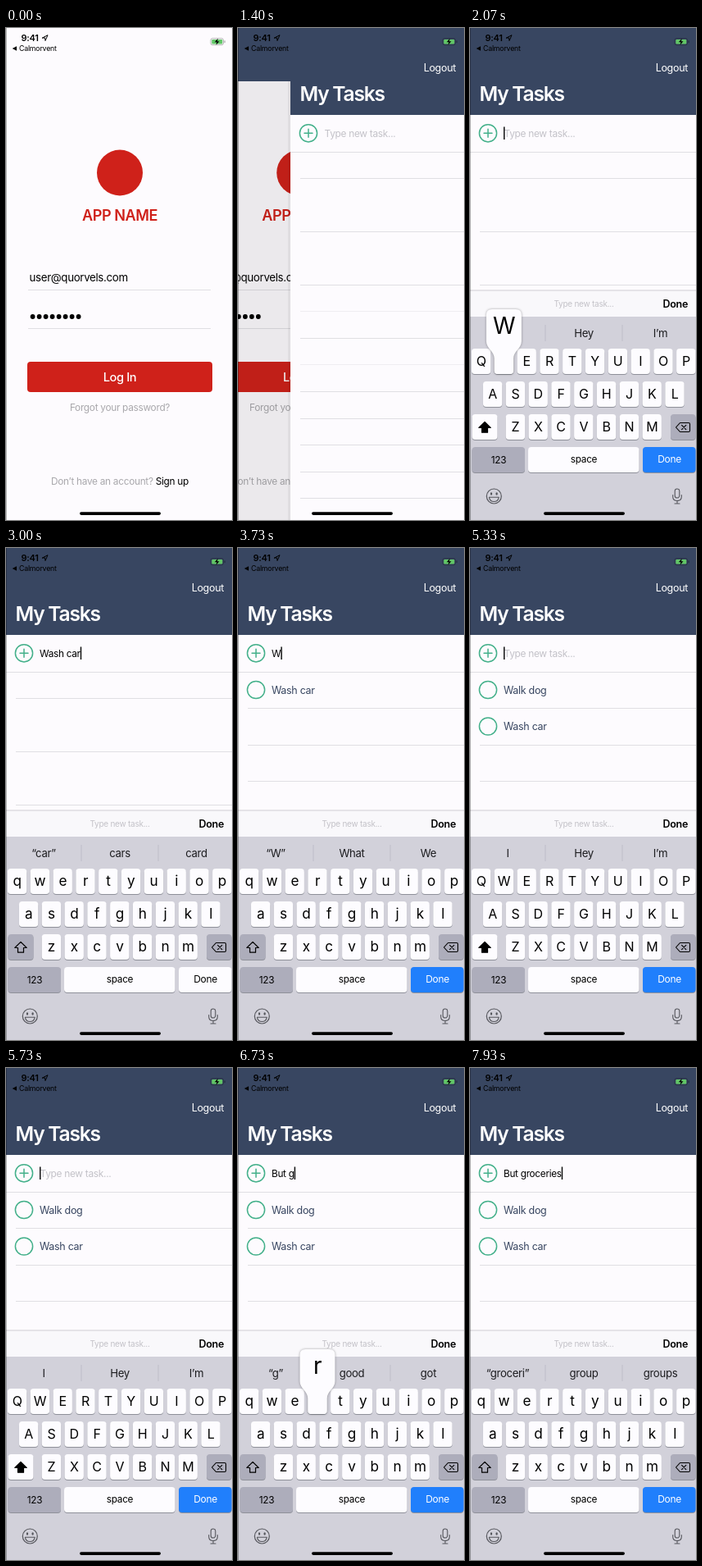
Animation, 276 px wide and 600 px high, one loop 8000 ms. Source, as an HTML page:

```html
<!DOCTYPE html>
<html lang="en">
<head>
<meta charset="utf-8">
<title>Task list</title>
<style>
  html, body { margin: 0; width: 100%; height: 100%; overflow: hidden; background: #fdfbfe; }
  svg { display: block; width: 276px; height: 600px; }
  text { font-family: Inter, Roboto, sans-serif; letter-spacing: -.025em; white-space: pre; }
</style>
</head>
<body>
<script>
const LOOP = 8000, W = 276, H = 600;
const PAPER = '#fdfbfe', NAVY = '#384661', RED = '#cf211a', GREEN = '#43b08a';
const LINE = '#e0dfe3', BLUE = '#207ffc', KEY = '#fdfcff', KEY_DARK = '#adadbb', HINT = '#c3c2c8';
const HOLD = 90, DONE_HOLD = 100;

const entries = [
  { word: 'Wash car', start: 1990, step: 115, done: 2960 },
  { word: 'Walk dog', start: 3600, step: 140, done: 4930 },
  { word: 'But groceries', start: 5915, step: 157, done: Infinity }
];

// Keyed by what has been typed; the longest matching prefix wins.
const suggestions = {
  '': 'I|Hey|I’m',
  'W': '“W”|What|We',
  'Wa': '“Wa”|Was|Want',
  'Was': '“Was”|Wasn’t|Wash',
  'Wash': '“Wash”|Washed|Washing',
  'Wash ': 'the|my|your',
  'Wash c': '“c”|can|could',
  'Wash ca': '“ca”|can|car',
  'Wash car': '“car”|cars|card',
  'Wal': '“Wal”|Walk|Wall',
  'Walk': '“Walk”|Walking|Walked',
  'Walk ': 'to|in|the',
  'Walk d': '“d”|do|down',
  'Walk do': '“do”|don’t|down',
  'Walk dog': '“dog”|dogs|dogg',
  'B': '“B”|But|Be',
  'Bu': '“Bu”|But|Busy',
  'But': '“But”|Butt|Button',
  'But ': 'I|it|you',
  'But g': '“g”|good|got',
  'But gr': '“gr”|great|group',
  'But gro': '“gro”|group|grow',
  'But groc': '“groc”|grocery|group',
  'But groce': '“groce”|grocery|grocer',
  'But groceri': '“groceri”|group|groups'
};

function el(parent, tag, attrs = {}, content) {
  const node = document.createElementNS('http://www.w3.org/2000/svg', tag);
  for (const name in attrs) node.setAttribute(name, attrs[name]);
  if (content !== undefined) node.textContent = content;
  return parent.appendChild(node);
}
const group = parent => el(parent, 'g');
const rect = (parent, x, y, width, height, fill, rx = 0) =>
  el(parent, 'rect', { x, y, width, height, fill, rx });
const label = (parent, x, y, size, content, attrs = {}) =>
  el(parent, 'text', { x, y, 'font-size': size, ...attrs }, content);
const centred = (parent, x, y, size, content, attrs = {}) =>
  label(parent, x, y, size, content, { 'text-anchor': 'middle', ...attrs });
const stroke = (parent, d, color, width = 1.2) =>
  el(parent, 'path', { d, fill: 'none', stroke: color, 'stroke-width': width,
    'stroke-linejoin': 'round', 'stroke-linecap': 'round' });
const ring = (parent, cx, cy, r, color, width) =>
  el(parent, 'circle', { cx, cy, r, fill: 'none', stroke: color, 'stroke-width': width });
const show = (node, on) => node.setAttribute('visibility', on ? 'visible' : 'hidden');
const move = (node, x, y) => node.setAttribute('transform', `translate(${x} ${y})`);
const clamp = (v, lo = 0, hi = 1) => Math.min(hi, Math.max(lo, v));
const easeOut = (t, start, length) => 1 - (1 - clamp((t - start) / length)) ** 3;

const svg = el(document.body, 'svg', { viewBox: `0 0 ${W} ${H}` });
rect(svg, 0, 0, W, H, PAPER);

// Login screen
const login = group(svg);
el(login, 'circle', { cx: 139, cy: 176.5, r: 28, fill: RED });
centred(login, 139, 234.5, 18.1, 'APP NAME', { 'font-weight': 600, fill: RED });
label(login, 28.5, 309, 13.3, 'user@quorvels.com');
for (let i = 0; i < 8; i++) el(login, 'circle', { cx: 32.6 + i * 8, cy: 352, r: 2.9 });
rect(login, 27, 319, 223, 1, LINE);
rect(login, 27, 366, 223, 1, LINE);
rect(login, 26, 407, 226, 37, RED, 4);
centred(login, 139, 431, 14.6, 'Log In', { 'font-weight': 500, fill: '#fff' });
centred(login, 139, 467, 11.85, 'Forgot your password?', { fill: '#a9a8ac' });
const signUp = centred(login, 139, 557, 11.85, '', { fill: '#a9a8ac' });
el(signUp, 'tspan', {}, 'Don’t have an account? ');
el(signUp, 'tspan', { fill: '#000' }, 'Sign up');
const dim = rect(svg, 0, 0, W, H, '#000');

// Task screen
const bar = rect(svg, 0, 0, W, 65, NAVY);
const page = group(svg);
rect(page, -3, 65, 3, H, 'rgba(0,0,0,.05)');
rect(page, 0, 0, W, H, PAPER);
rect(page, 0, 0, W, 106, NAVY);
label(page, 11.5, 89, 24.6, 'My Tasks',
  { 'font-weight': 600, fill: '#fff', style: 'letter-spacing:-.05em' });
ring(page, 22, 128.3, 10.6, GREEN, 1.5);
stroke(page, 'M17 128.3h10M22 123.3v10', GREEN, 1.5);
rect(page, 0, 151, W, 1, LINE);
const hint = label(page, 41.5, 132.5, 11.9, 'Type new task...', { fill: HINT });
const input = label(page, 41, 132.5, 11.8, '');
const caret = rect(page, 41, 120.5, 1.5, 15.5, '#111');

const emptyLines = group(page);
for (const y of [183, 248, 313, 345, 378, 410, 443, 476, 508, 541, 573])
  rect(emptyLines, 12, y, W, 1, y === 345 || y === 410 ? '#efedf1' : LINE);
const taskLines = group(page);
for (const y of [195, 240, 284]) rect(taskLines, 12, y, W, 1, LINE);

const rows = [173, 217.5].map(y => {
  const row = group(page);
  ring(row, 22, y, 10.6, GREEN, 1.5);
  return { row, name: label(row, 41, y + 4.5, 12.5, '', { fill: NAVY }) };
});
const logout = label(svg, 266, 53, 12.5, 'Logout', { 'text-anchor': 'end', fill: '#fff' });

// Keyboard with its toolbar
const keyboard = group(svg);
rect(keyboard, 0, 320, W, 33, '#f9f8fb');
rect(keyboard, 0, 319.5, W, 1, '#cfced3');
centred(keyboard, 139, 340, 10, 'Type new task...', { fill: HINT });
label(keyboard, 266, 340.5, 12.5, 'Done', { 'text-anchor': 'end', 'font-weight': 600 });
rect(keyboard, 0, 352, W, 248, '#d2d1da');
for (const x of [92, 186]) rect(keyboard, x - .5, 362, 1, 20, '#bdbec7');
const guesses = [46, 139, 232.5].map(x => centred(keyboard, x, 376.5, 13.2, '', { fill: '#1c1c1f' }));

function cap(x, y, width, fill = KEY) {
  rect(keyboard, x, y + 1, width, 31, '#8e9099', 4);
  return rect(keyboard, x, y, width, 31, fill, 4);
}
const keys = {};
[['qwertyuiop', 13.6, 391], ['asdfghjkl', 27.6, 431], ['zxcvbnm', 55.4, 471]]
  .forEach(([letters, x0, y]) => [...letters].forEach((char, i) => {
    const x = x0 + 27.8 * i;
    cap(x - 11.7, y, 23.4);
    keys[char] = { x, y, text: centred(keyboard, x, y + 21.2, 17, char) };
  }));
const shiftCap = cap(2.5, 471, 31);
const shiftIcon = stroke(keyboard, 'M18 480.3l-7.2 7.2h3.7v5.7h7v-5.7h3.7z', '#000', 1.2);
cap(245, 471, 30.5, KEY_DARK);
stroke(keyboard, 'M256.5 481.5h10.5q1.5 0 1.5 1.5v8q0 1.5-1.5 1.5h-10.5l-5-5.5zM258.6 484.4l5.2 5.2m0-5.2l-5.2 5.2', '#000', 1.1);
cap(2.5, 511, 64.5, KEY_DARK);
centred(keyboard, 35, 530.5, 11.8, '123');
const spaceCap = cap(71, 511, 135.5);
centred(keyboard, 139, 530, 11.8, 'space');
const doneCap = cap(211, 511, 64.5);
const doneText = centred(keyboard, 243.5, 530, 12, 'Done');

const ICON = '#55565c';
ring(keyboard, 29.3, 571, 9, ICON, 1.2);
for (const cx of [26, 32.6]) el(keyboard, 'ellipse', { cx, cy: 568, rx: 1.2, ry: 1.8, fill: ICON });
stroke(keyboard, 'M23.4 572.3h11.8q-.8 5.2-5.9 5.2t-5.9-5.2z', ICON, 1.1);
el(keyboard, 'rect', { x: 250.2, y: 562, width: 5.6, height: 11, rx: 2.8,
  fill: 'none', stroke: ICON, 'stroke-width': 1.1 });
stroke(keyboard, 'M247.7 569.5v2q0 5 5.3 5t5.3-5v-2M253 576.5v3.5m-3 0h6', ICON, 1.1);

const popup = group(keyboard);
el(popup, 'path', {
  d: 'M-11.7 27V12C-11.7 3-21.5 0-21.5-9V-41Q-21.5-48-14.5-48H14.5Q21.5-48 21.5-41V-9C21.5 0 11.7 3 11.7 12V27Q11.7 31 7.7 31H-7.7Q-11.7 31-11.7 27Z',
  fill: KEY, style: 'filter:drop-shadow(0 .5px 1.5px rgba(0,0,0,.35))'
});
const popupText = centred(popup, 0, -18, 28, '');

// Status bar, home indicator and screen edge
label(svg, 18.5, 16, 11, '9:41', { 'font-weight': 600 });
stroke(svg, 'M44.5 12l6.5-3.3-3 6.8-.4-3.2z', '#000', 1);
el(svg, 'path', { d: 'M13 22.3v5.4l-5.3-2.7z' });
label(svg, 16, 28, 8.8, 'Calmorvent');
el(svg, 'rect', { x: 250, y: 12.7, width: 15.5, height: 8, rx: 2.2,
  fill: 'none', stroke: 'rgba(0,0,0,.35)', 'stroke-width': .8 });
rect(svg, 251.3, 14, 13, 5.4, '#62c767', 1.2);
rect(svg, 266.5, 15.2, 1.2, 3, 'rgba(0,0,0,.35)', .6);
el(svg, 'path', { d: 'M258.8 12.8l-4 4.4h2.6l-.9 3.5 4-4.5h-2.5z' });
rect(svg, 90, 590.3, 99, 3.6, '#000', 1.8);
rect(svg, 0, 0, 1, H, 'rgba(0,0,0,.28)');

function suggest(typed) {
  let length = typed.length;
  while (!(typed.slice(0, length) in suggestions)) length--;
  return suggestions[typed.slice(0, length)].split('|');
}

function draw(t) {
  const push = easeOut(t, 1208, 500);
  move(login, -83 * push, 0);
  dim.setAttribute('opacity', .09 * push);
  show(bar, push > 0);
  show(page, push > 0);
  move(page, Math.round(W * (1 - push)), 0);
  logout.setAttribute('opacity', clamp(push * 1.3));
  move(keyboard, 0, 281 * (1 - easeOut(t, 1650, 250)));

  const tasks = entries.filter(e => t >= e.done + DONE_HOLD).map(e => e.word).reverse();
  const { word, start, step, done } = entries[tasks.length];
  const since = t - start;
  const count = clamp(Math.floor((since - HOLD) / step) + 1, 0, word.length);
  const typed = word.slice(0, count);
  const upper = count === 0;
  const setCase = char => upper ? char.toUpperCase() : char;

  input.textContent = typed;
  show(hint, upper && push > 0);
  show(caret, t >= 1650);
  caret.setAttribute('x', 41 + (upper ? 0 : input.getComputedTextLength()));
  show(emptyLines, !tasks.length && push > 0);
  show(taskLines, tasks.length);
  rows.forEach(({ row, name }, i) => {
    show(row, i < tasks.length);
    name.textContent = tasks[i] || '';
  });

  suggest(typed).forEach((guess, i) => guesses[i].textContent = guess);
  for (const char in keys) {
    keys[char].text.textContent = setCase(char);
    keys[char].text.setAttribute('font-size', upper ? 16 : 17.2);
  }
  shiftCap.setAttribute('fill', upper ? KEY : KEY_DARK);
  shiftIcon.setAttribute('fill', upper ? '#000' : 'none');

  const touching = since >= 0 && since % step < HOLD;
  const pressed = touching ? (word[Math.floor(since / step)] || '').toLowerCase() : '';
  const key = keys[pressed];
  show(popup, key);
  if (key) {
    move(popup, key.x, key.y);
    popupText.textContent = setCase(pressed);
  }
  spaceCap.setAttribute('fill', pressed === ' ' ? KEY_DARK : KEY);
  const donePressed = t >= done;
  doneCap.setAttribute('fill', donePressed ? KEY : BLUE);
  doneText.setAttribute('fill', donePressed ? '#000' : '#fff');
}

const origin = performance.now();
function tick() {
  draw((performance.now() - origin) % LOOP);
  requestAnimationFrame(tick);
}
tick();
</script>
</body>
</html>
```
